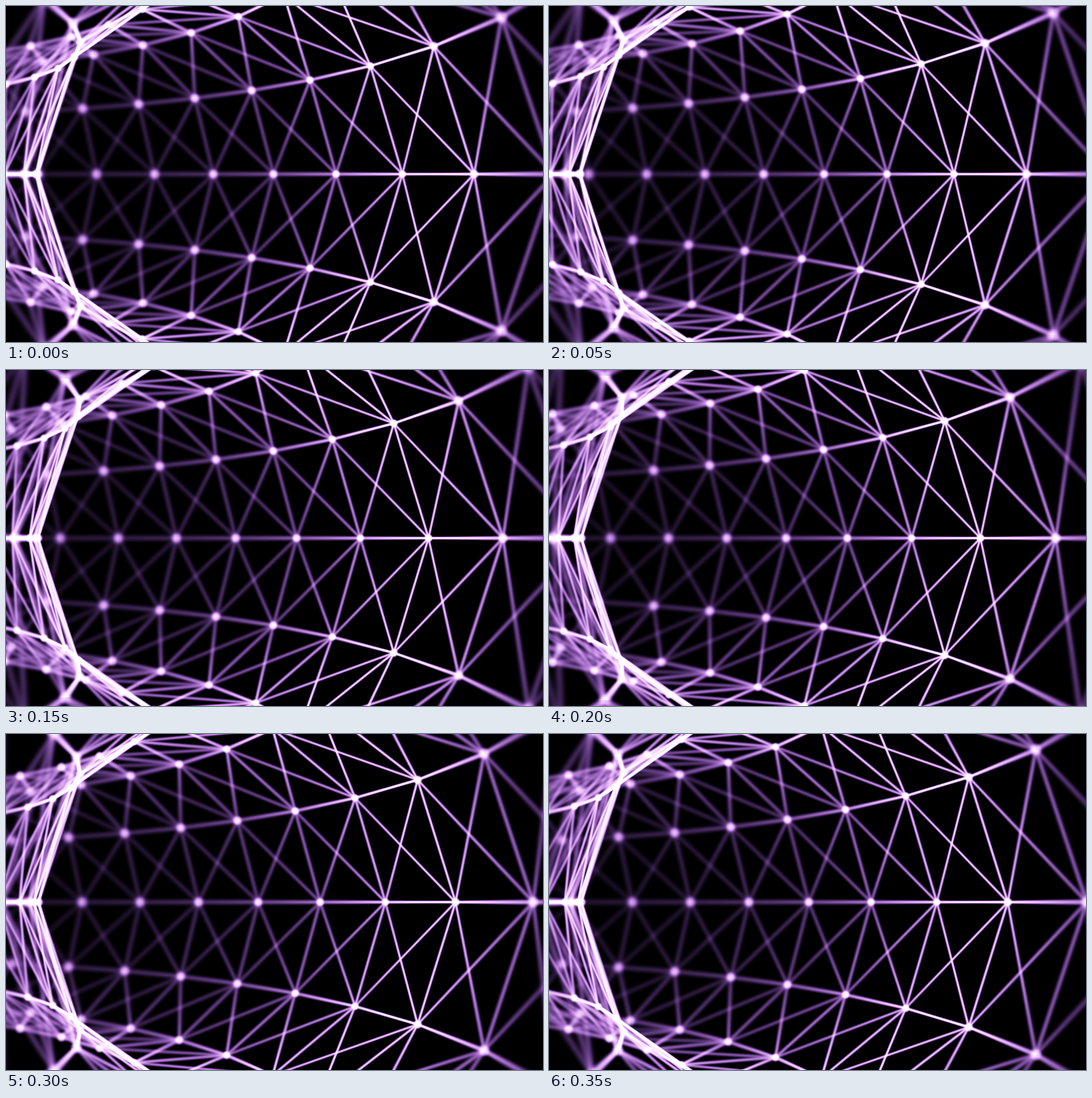
Recreate the animation shown at these times as an HTML page with a canvas. Size 945x592 px, loop 400 ms.

```html
<!DOCTYPE html>
<html lang="en">
<head>
<meta charset="utf-8">
<title>Inside a wireframe torus</title>
<style>
  html, body { margin: 0; width: 100%; height: 100%; overflow: hidden; background: #000; }
  canvas { display: block; }
</style>
</head>
<body>
<canvas id="stage" width="945" height="592"></canvas>
<script>
const WIDTH = 945, HEIGHT = 592;
const STEPS = 8, STEP_MS = 50;
const SIDES = 10, RING_ANGLE = Math.PI * 2 / 45;
const FIRST_RING = -4, LAST_RING = 14;
const MAJOR_RADIUS = 4, FOCAL = 1396;
const FOCUS = 348;            // scale (pixels per unit) that is perfectly sharp

const ctx = document.getElementById('stage').getContext('2d');
const light = new Float32Array(WIDTH * HEIGHT);

// Light intensity to colour: black, purple, white.
const SHADES = 1024, SHADES_PER_UNIT = 100;
const palette = new Uint32Array(SHADES);
for (let i = 0; i < SHADES; i++) {
  const channel = gain => Math.round(255 * (1 - Math.exp(-gain * i / SHADES_PER_UNIT)));
  palette[i] = (255 << 24 | channel(1.3) << 16 | channel(0.5) << 8 | channel(0.9)) >>> 0;
}

// Torus vertex on the screen; the tube has radius 1 and the lens is shifted sideways.
function project(ring, side) {
  const turn = (6.48 - ring) * RING_ANGLE;
  const around = side * Math.PI * 2 / SIDES;
  const radius = MAJOR_RADIUS + Math.cos(around);
  const depth = 0.002378 + radius * Math.sin(turn) / FOCAL;
  if (depth < 0.0004) return null;
  const scale = 1 / depth;
  const across = radius * (Math.cos(turn) - 0.18 * Math.sin(turn)) - 4.01;
  return { x: 472.5 + across * scale, y: 295.7 - Math.sin(around) * scale, scale };
}

// Gaussian stroke whose width follows the depth of field along the edge.
function addEdge(a, b) {
  if (!a || !b) return;
  const dx = b.x - a.x, dy = b.y - a.y;
  const length = Math.hypot(dx, dy);
  if (length < 0.5) return;
  const flat = Math.abs(dx) > Math.abs(dy);
  const [from, span, start, slope] = flat ? [a.x, dx, a.y, dy / dx] : [a.y, dy, a.x, dx / dy];
  const [mainSize, crossSize] = flat ? [WIDTH, HEIGHT] : [HEIGHT, WIDTH];
  const [mainStride, crossStride] = flat ? [1, WIDTH] : [WIDTH, 1];
  const stretch = 1 + slope * slope;
  const first = Math.max(0, Math.ceil(Math.min(from, from + span)));
  const last = Math.min(mainSize - 1, Math.floor(Math.max(from, from + span)));

  for (let p = first; p <= last; p++) {
    const scale = a.scale + (b.scale - a.scale) * (p - from) / span;
    const blur = 0.024 * (scale - FOCUS);
    const variance = 1.15 + blur * blur;
    const peak = 0.008 * scale * scale / Math.max(length, 12) / variance;
    const falloff = 1 / (2 * variance * stretch);
    const reach = 3 * Math.sqrt(variance * stretch);
    const center = start + slope * (p - from);
    const end = Math.min(crossSize - 1, Math.floor(center + reach));
    for (let q = Math.max(0, Math.ceil(center - reach)); q <= end; q++) {
      const d = q - center;
      light[p * mainStride + q * crossStride] += peak * Math.exp(-d * d * falloff);
    }
  }
}

function addNode(node) {
  if (!node) return;
  const { x, y, scale } = node;
  const body = (0.016 * scale) ** 2;
  const size = body + (0.045 * (scale - FOCUS)) ** 2;
  const clarity = body / size;
  const peak = 8 * clarity * Math.min(1, (FOCUS / scale) ** 4);
  const power = 1 + clarity;
  const reach = 2.1 * Math.sqrt(size);
  const right = Math.min(WIDTH - 1, x + reach), bottom = Math.min(HEIGHT - 1, y + reach);
  for (let py = Math.max(0, Math.ceil(y - reach)); py <= bottom; py++) {
    for (let px = Math.max(0, Math.ceil(x - reach)); px <= right; px++) {
      const r2 = ((px - x) ** 2 + (py - y) ** 2) / size;
      light[py * WIDTH + px] += peak * Math.exp(-(r2 ** power));
    }
  }
}

function render(step) {
  light.fill(0);
  const rings = [];
  for (let ring = FIRST_RING; ring <= LAST_RING; ring++) {
    rings.push(Array.from({ length: SIDES }, (_, side) => project(ring + step / STEPS, side)));
  }
  rings.forEach((ring, i) => {
    const next = rings[i + 1];
    ring.forEach((node, side) => {
      const beside = (side + 1) % SIDES;
      addNode(node);
      addEdge(node, ring[beside]);
      if (!next) return;
      addEdge(node, next[side]);
      addEdge(node, next[beside]);
      addEdge(ring[beside], next[side]);
    });
  });

  const image = ctx.createImageData(WIDTH, HEIGHT);
  const pixels = new Uint32Array(image.data.buffer);
  for (let i = 0; i < pixels.length; i++) {
    pixels[i] = palette[Math.min(SHADES - 1, light[i] * SHADES_PER_UNIT | 0)];
  }
  return image;
}

const images = Array.from({ length: STEPS }, (_, step) => render(step));

function draw(now) {
  ctx.putImageData(images[Math.floor(now / STEP_MS) % STEPS], 0, 0);
  requestAnimationFrame(draw);
}
draw(0);
</script>
</body>
</html>
```
